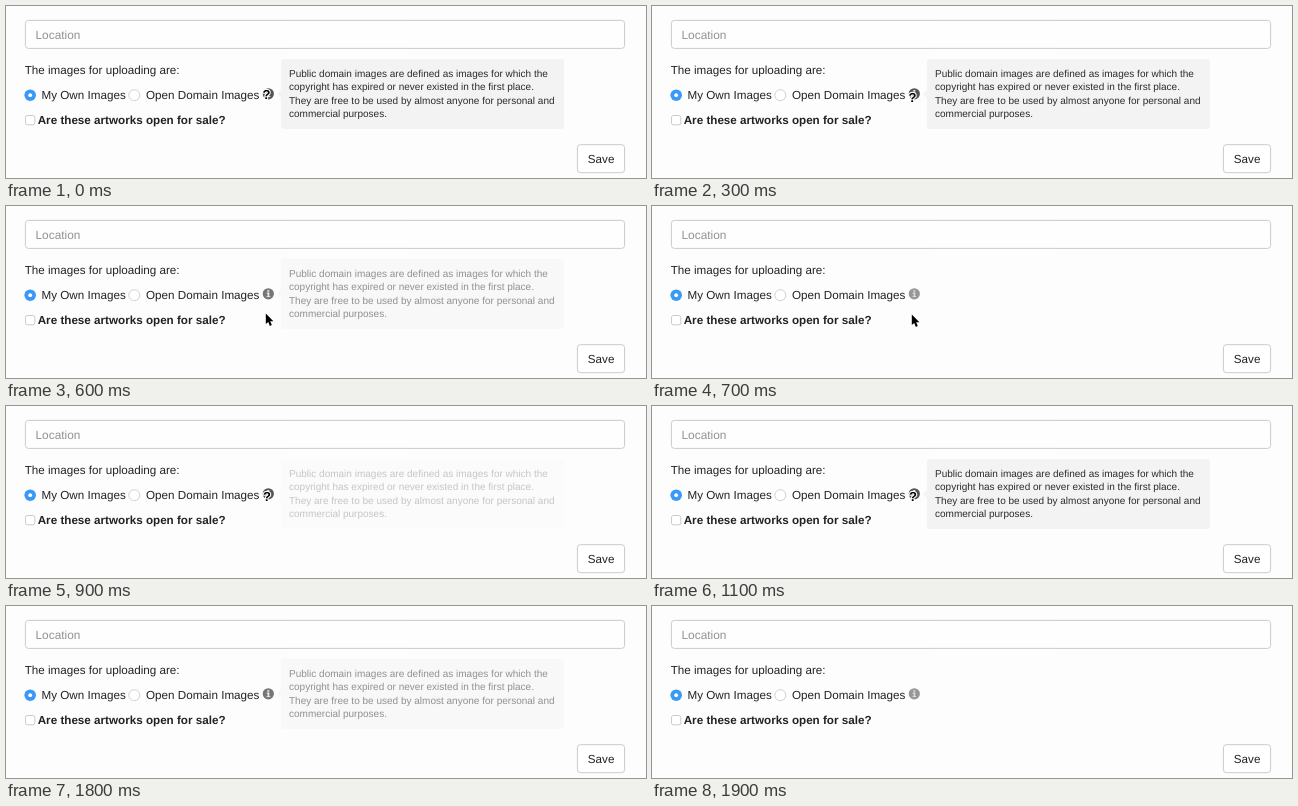
An HTML page with a canvas for the animation above (2.4 s loop, 640 by 172 pixels).

```html
<!DOCTYPE html>
<html lang="en">
<head>
<meta charset="utf-8">
<title>Upload form tooltip</title>
<style>
html, body { margin: 0; width: 100%; height: 100%; overflow: hidden; background: #fdfdfd; }
canvas { display: block; width: 640px; height: 172px; }
</style>
</head>
<body>
<canvas id="stage" width="640" height="172"></canvas>
<script>
const ctx = document.getElementById('stage').getContext('2d');
const LOOP = 2400;
const STEP = 100;
const FAMILY = '"Liberation Sans", Arial, sans-serif';
const TOOLTIP = [
  'Public domain images are defined as images for which the',
  'copyright has expired or never existed in the first place.',
  'They are free to be used by almost anyone for personal and',
  'commercial purposes.'
];

// Each key holds its values until the next one: [time, ...values]
const tooltipKeys = [[0, 1], [600, 0.5], [700, 0], [900, 0.25], [1000, 0.65], [1100, 1], [1800, 0.5], [1900, 0]];
const iconKeys = [[0, 1], [600, 0.8], [700, 0.6], [800, 0.75], [900, 1], [1800, 0.8], [1900, 0.6]];
const cursorKeys = [
  [0, 'help', 260.5, 88.5], [200, 'help', 260.5, 89.5], [300, 'help', 260.5, 91],
  [400, 'arrow', 259.8, 95], [500, 'arrow', 259.8, 98], [600, 'arrow', 259.8, 107.5],
  [700, 'arrow', 259.8, 108.5], [800, 'help', 261, 93], [900, 'help', 261, 90.5],
  [1700, 'arrow', 279.8, 29.5], [1800, 'none', 0, 0]
];

function valueAt(keys, time) {
  let current = keys[0];
  for (const key of keys) if (key[0] <= time) current = key;
  return current.slice(1);
}

function text(string, x, y, { size = 11.67, weight = 'normal', color = '#222' } = {}) {
  ctx.font = `${weight} ${size}px ${FAMILY}`;
  ctx.fillStyle = color;
  ctx.fillText(string, x, y);
}

function box(x, y, w, h, radius, fill, stroke) {
  ctx.beginPath();
  ctx.roundRect(x, y, w, h, radius);
  ctx.fillStyle = fill;
  ctx.fill();
  if (!stroke) return;
  ctx.strokeStyle = stroke;
  ctx.lineWidth = 1;
  ctx.stroke();
}

function disc(x, y, radius, fill, stroke) {
  box(x - radius, y - radius, radius * 2, radius * 2, radius, fill, stroke);
}

function drawForm() {
  box(19.4, 14.4, 599.2, 28, 3, '#fefefe', '#cbcbcb');
  text('Location', 29.5, 32.6, { size: 11.9, color: '#929292' });
  text('The images for uploading are:', 18.7, 67.5);
  disc(24.2, 89.2, 5.8, '#3b99f6');
  disc(24.2, 89.2, 1.9, '#fff');
  text('My Own Images', 35.5, 92.7);
  disc(128.3, 89.2, 5.5, '#fff', '#d2d2d2');
  text('Open Domain Images', 140, 92.7);
  box(19.5, 109.5, 9.3, 9.3, 2, '#fff', '#cbcbcb');
  text('Are these artworks open for sale?', 31.7, 117.7, { weight: 'bold' });
  box(571.4, 138.7, 47.2, 28, 3, '#fff', '#cbcbcb');
  text('Save', 581.8, 156.9);
}

function drawIcon(alpha) {
  ctx.globalAlpha = alpha;
  disc(262.3, 87.8, 5.6, '#545454');
  ctx.fillStyle = '#fdfdfd';
  ctx.fillRect(261.3, 84.1, 2, 1.6);
  ctx.fillRect(260.6, 86.6, 2.7, 1);
  ctx.fillRect(261.5, 86.6, 1.8, 4);
  ctx.fillRect(260.5, 90.1, 3.8, 1);
  ctx.globalAlpha = 1;
}

function drawTooltip(alpha) {
  ctx.globalAlpha = alpha;
  box(275, 53, 283, 70, 3, '#f3f3f3');
  ctx.beginPath();
  ctx.moveTo(275, 84);
  ctx.lineTo(271, 88);
  ctx.lineTo(275, 92);
  ctx.fill();
  TOOLTIP.forEach((line, i) => text(line, 283, 71 + i * 13.3, { size: 10.03, color: '#2c2c2c' }));
  ctx.globalAlpha = 1;
}

function drawArrow(x, y) {
  const outline = [[0, 0], [0, 10.6], [2.4, 8.5], [4.1, 12.4], [6, 11.6], [4.4, 7.8], [7.6, 7.8]];
  ctx.beginPath();
  outline.forEach(([dx, dy]) => ctx.lineTo(x + dx, y + dy));
  ctx.closePath();
  ctx.lineWidth = 1.6;
  ctx.strokeStyle = '#fff';
  ctx.stroke();
  ctx.fillStyle = '#000';
  ctx.fill();
}

function drawHelp(x, y) {
  ctx.font = `bold 13px ${FAMILY}`;
  ctx.textAlign = 'center';
  ctx.lineJoin = 'round';
  ctx.lineWidth = 2.2;
  ctx.strokeStyle = '#fff';
  ctx.strokeText('?', x, y + 4.7);
  ctx.fillStyle = '#000';
  ctx.fillText('?', x, y + 4.7);
  ctx.textAlign = 'left';
}

function draw(time) {
  ctx.textRendering = 'geometricPrecision';
  ctx.fillStyle = '#fdfdfd';
  ctx.fillRect(0, 0, 640, 172);
  drawForm();
  drawIcon(valueAt(iconKeys, time)[0]);
  drawTooltip(valueAt(tooltipKeys, time)[0]);
  const [shape, x, y] = valueAt(cursorKeys, time);
  if (shape === 'arrow') drawArrow(x, y);
  if (shape === 'help') drawHelp(x, y);
}

const start = performance.now();
function tick() {
  const elapsed = (performance.now() - start) % LOOP;
  draw(Math.floor(elapsed / STEP) * STEP);
  requestAnimationFrame(tick);
}
tick();
</script>
</body>
</html>
```
